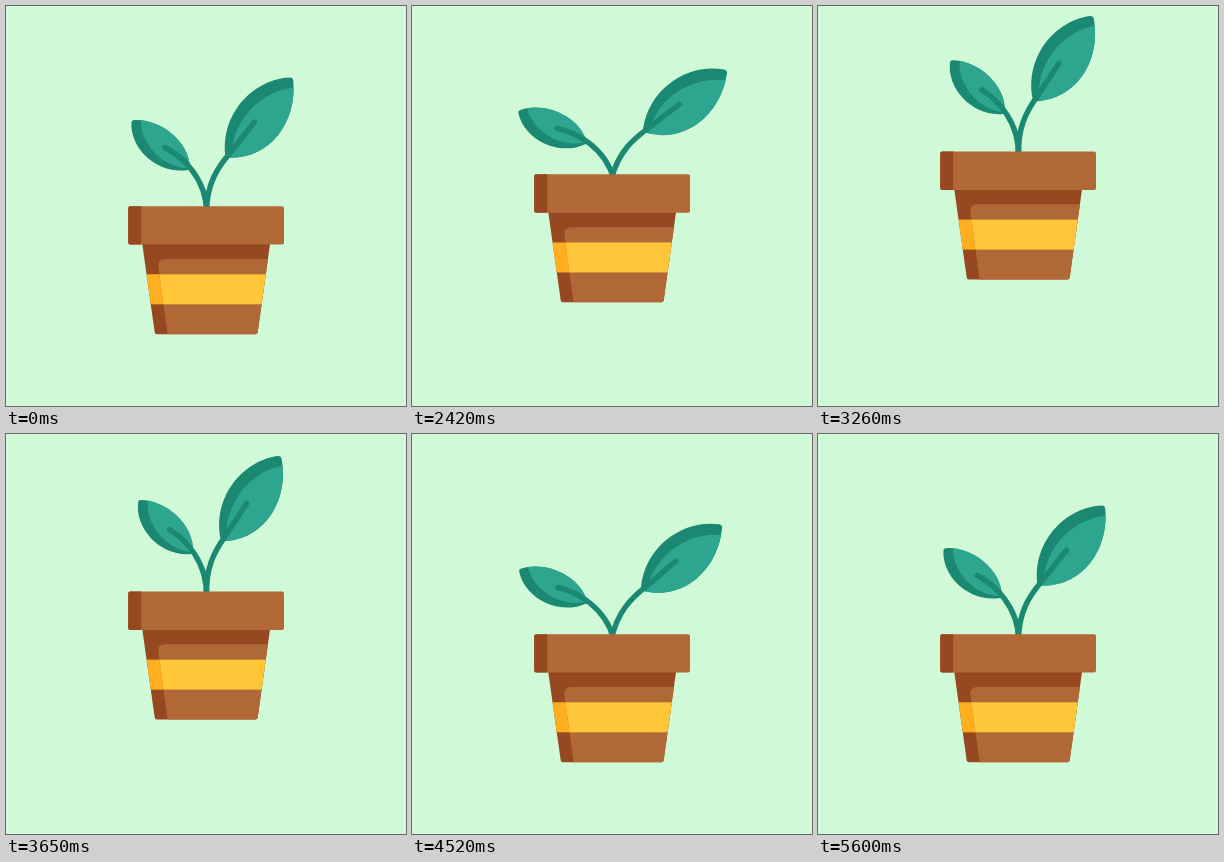
These frames come from a looping animation (400 by 400 pixels, 5660 ms). An HTML page with a canvas:

```html
<!DOCTYPE html>
<html lang="en">
<head>
<meta charset="utf-8">
<title>Hopping plant</title>
<style>
  html, body { margin: 0; width: 100%; height: 100%; overflow: hidden; background: #d0fad7; }
  canvas { display: block; width: 400px; height: 400px; }
</style>
</head>
<body>
<canvas id="stage"></canvas>
<script>
const canvas = document.getElementById('stage');
const ctx = canvas.getContext('2d');
const ratio = window.devicePixelRatio || 1;
canvas.width = canvas.height = 400 * ratio;

const LOOP = 5660, STEP = 30, FIRST_STEP = 2030;
const COLOR = {
  sky: '#d0fad7', clay: '#b06836', clayDark: '#964820',
  band: '#ffc63a', bandDark: '#ffae20', leaf: '#2da58f', leafDark: '#1b8871'
};
const PIVOT = { x: 200.5, y: 200 };

// Keyframes: [time in ms, value]
const hop = [[2000, 0], [2760, -54.7], [3390, -54.7], [4226, 0]];
const swayTimes = [2000, 2400, 3300, 3710, 4380, 5110, 5600];
const sway = values => swayTimes.map((time, i) => [time, values[i]]);
const leftSway = sway([0, 15, -4.5, -4.5, 16.2, -6.2, 0]);
const rightSway = sway([0, 14, -5.2, -5.2, 13, -6.4, 0]);

function valueAt(keys, t) {
  if (t <= keys[0][0]) return keys[0][1];
  for (let i = 1; i < keys.length; i++) {
    const [t0, a] = keys[i - 1], [t1, b] = keys[i];
    if (t < t1) return a + (b - a) * (1 - Math.cos(Math.PI * (t - t0) / (t1 - t0))) / 2;
  }
  return keys[keys.length - 1][1];
}

const leftPlant = {
  outline: new Path2D('M127.5 114.2 C152 112 183 134 184 161.5 Q184.2 164 182 164 C152 169 124 143 125.4 116.5 Q125.5 114.4 127.5 114.2 Z'),
  light: new Path2D('M135 105 L135 114 C134 138 158 163 184 162 L200 140 Z'),
  stem: new Path2D('M159 141.5 C176 150 200 172 200.5 205')
};
const rightPlant = {
  outline: new Path2D('M283.5 71.6 C250 73 215 105 219.3 149 Q219.6 151.6 222 151.6 C262 154 291 118 287.3 75 Q287 71.4 283.5 71.6 Z'),
  light: new Path2D('M290 81.5 C258 83 224 112 225 155 L300 155 Z'),
  stem: new Path2D('M248.5 116 L224 147 C212 161 201 177 200.5 205')
};
const potBody = new Path2D('M136 236 L264.3 236 L251.7 326.2 Q251.4 328.2 249.4 328.2 L151 328.2 Q149 328.2 148.7 326.2 Z');
const potLight = new Path2D('M270 253 L159 253 Q151.5 253 152.4 261 L161.8 330 L270 330 Z');

function fill(color, path) {
  ctx.fillStyle = color;
  ctx.fill(path);
}

function drawPlant(plant, degrees) {
  ctx.save();
  ctx.translate(PIVOT.x, PIVOT.y);
  ctx.rotate(degrees * Math.PI / 180);
  ctx.translate(-PIVOT.x, -PIVOT.y);
  fill(COLOR.leafDark, plant.outline);
  ctx.save();
  ctx.clip(plant.outline);
  fill(COLOR.leaf, plant.light);
  ctx.restore();
  ctx.strokeStyle = COLOR.leafDark;
  ctx.lineWidth = 5.4;
  ctx.lineCap = 'round';
  ctx.stroke(plant.stem);
  ctx.restore();
}

function paintStripes(clay, band) {
  ctx.fillStyle = clay;
  ctx.fillRect(120, 230, 160, 100);
  ctx.fillStyle = band;
  ctx.fillRect(120, 268.3, 160, 30);
}

function drawPot() {
  ctx.save();
  ctx.clip(potBody);
  paintStripes(COLOR.clayDark, COLOR.bandDark);
  ctx.clip(potLight);
  paintStripes(COLOR.clay, COLOR.band);
  ctx.restore();

  const rim = new Path2D();
  rim.roundRect(122.2, 200.2, 155.8, 38.4, 2);
  fill(COLOR.clay, rim);
  ctx.save();
  ctx.clip(rim);
  ctx.fillStyle = COLOR.clayDark;
  ctx.fillRect(120, 198, 15.2, 44);
  ctx.restore();
}

function draw(t) {
  ctx.setTransform(ratio, 0, 0, ratio, 0, 0);
  ctx.fillStyle = COLOR.sky;
  ctx.fillRect(0, 0, 400, 400);
  ctx.translate(0, valueAt(hop, t));
  drawPlant(leftPlant, -valueAt(leftSway, t));
  drawPlant(rightPlant, valueAt(rightSway, t));
  drawPot();
}

const start = performance.now();
function frame() {
  const t = (performance.now() - start) % LOOP;
  draw(t < FIRST_STEP ? 0 : FIRST_STEP + Math.floor((t - FIRST_STEP) / STEP) * STEP);
  requestAnimationFrame(frame);
}
frame();
</script>
</body>
</html>
```
